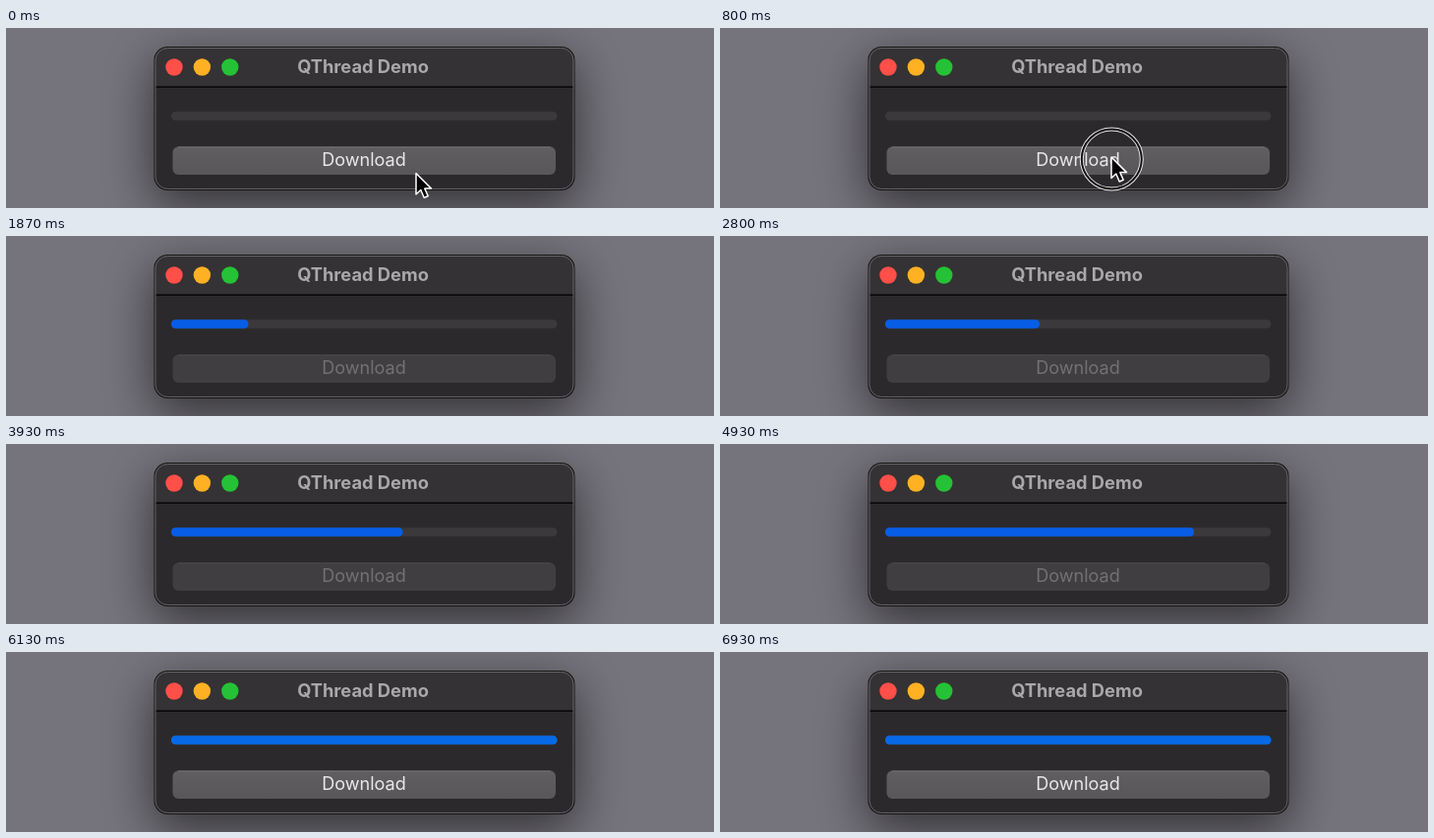
These frames come from a looping animation (720 by 184 pixels, 6960 ms). An HTML page:

```html
<!DOCTYPE html>
<html lang="en">
<head>
<meta charset="utf-8">
<title>QThread Demo</title>
<style>
  html, body { margin: 0; width: 100%; height: 100%; overflow: hidden; background: #75737b; }
  svg { display: block; }
  text { font-family: Inter, Roboto, sans-serif; text-anchor: middle; }
</style>
</head>
<body>
<svg width="720" height="184" viewBox="0 0 720 184">
  <defs>
    <filter id="blur" x="-50%" y="-100%" width="200%" height="300%">
      <feGaussianBlur stdDeviation="25"/>
    </filter>
    <linearGradient id="face" x2="0" y2="1">
      <stop stop-color="#605e60"/>
      <stop offset="1" stop-color="#585658"/>
    </linearGradient>
  </defs>

  <!-- window -->
  <rect x="151" y="34" width="427" height="147" rx="14" opacity=".58" filter="url(#blur)"/>
  <rect x="150.5" y="19" width="428" height="147" rx="14" fill="#111"/>
  <rect x="151.5" y="20" width="426" height="145" rx="13" fill="#2b292b"/>
  <path d="M151.5 60V33a13 13 0 0 1 13-13h400a13 13 0 0 1 13 13V60z" fill="#343234"/>
  <path d="M152 60.3H577" stroke="#060606" stroke-width="1.4"/>
  <rect x="152" y="20.5" width="425" height="144" rx="12.5" fill="none" stroke="#666467"/>
  <circle cx="171" cy="40" r="8.7" fill="#ff4f49"/>
  <circle cx="199.4" cy="40" r="8.7" fill="#ffb123"/>
  <circle cx="227.8" cy="40" r="8.7" fill="#25c136"/>
  <text x="363" y="46" font-size="18.3" font-weight="700" fill="#aaa8aa">QThread Demo</text>

  <!-- progress bar and button -->
  <rect x="168" y="85.5" width="392.5" height="9" rx="4.5" fill="#3b393b"/>
  <rect id="bar" x="168" y="85.5" height="9" rx="4.2"/>
  <rect id="button" x="169.5" y="121.3" width="389.5" height="28.7" rx="6"/>
  <path id="shine" d="M175 121.8H553.5" stroke="#737173"/>
  <text id="label" x="364" y="141.2" font-size="18.1">Download</text>

  <!-- pointer -->
  <g id="ring" fill="none">
    <circle cx="398.3" cy="134" r="30.5" stroke="#e8e8e8" stroke-width="4"/>
    <circle cx="398.3" cy="134" r="30.5" stroke="#111" stroke-width="2"/>
  </g>
  <path id="cursor" d="M0 0V21.5L4.8 17L8.2 25L12.2 23.3L8.8 15.6H15.5Z"
        fill="#000" stroke="#fff" stroke-width="1.5" stroke-linejoin="round"/>
</svg>
<script>
const LOOP = 6960, START = 970, STEP = 1000;
const set = (id, attrs) => {
  const el = document.getElementById(id);
  for (const name in attrs) el.setAttribute(name, attrs[name]);
};
const ease = (t, from, to) => {
  const p = Math.min(1, Math.max(0, (t - from) / (to - from)));
  return p * p * (3 - 2 * p);
};
const show = on => ({ visibility: on ? 'visible' : 'hidden' });

function draw(t) {
  const done = Math.max(0, Math.min(5, Math.floor((t - START) / STEP) + 1));
  const busy = t >= START && t < START + 5 * STEP;
  set('bar', { width: 78.5 * done, fill: done === 5 ? '#066ae6' : '#075de6' });
  set('button', { fill: busy ? '#403e40' : 'url(#face)' });
  set('shine', { stroke: busy ? '#4b494b' : '#737173' });
  set('label', { fill: busy ? '#737173' : '#e9e8e9' });

  // approach, click, then leave downwards
  const come = ease(t, 30, 640), leave = ease(t, 1500, 1800);
  const x = 417 - 19 * come, y = 148.5 - 16.5 * come + 21 * leave;
  set('cursor', { transform: `translate(${x} ${y})`, ...show(t < 1800) });
  set('ring', show(t >= 760 && t < 930));
}

function tick() {
  draw(performance.now() % LOOP);
  requestAnimationFrame(tick);
}
tick();
</script>
</body>
</html>
```
